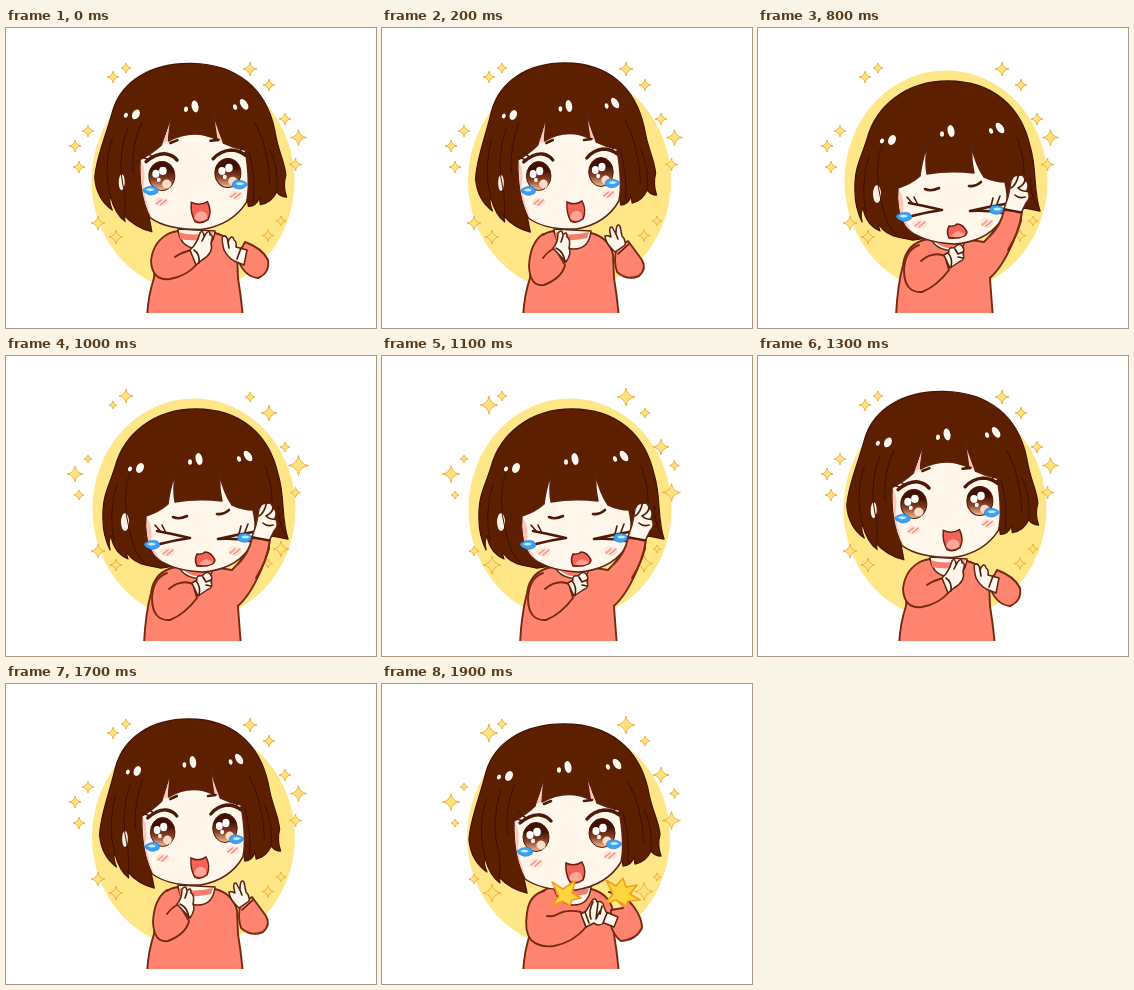
Animation, 370 px wide and 300 px high, one loop 2 s. Source, as an HTML page:

```html
<!DOCTYPE html>
<html lang="en">
<head>
<meta charset="utf-8">
<title>Applause</title>
<style>
html, body { margin: 0; width: 100%; height: 100%; overflow: hidden; background: #fff; }
svg { display: block; width: 100%; height: 100%; }
.line { fill: none; stroke: #4b1b08; stroke-width: 1.6; stroke-linecap: round; stroke-linejoin: round; }
.hair { fill: #5c1f00; stroke: #481500; stroke-width: 1.3; stroke-linejoin: round; }
.strand { fill: none; stroke: #3d1000; stroke-width: 1; stroke-linecap: round; }
.skin { fill: #fff6ec; stroke: #5b2210; stroke-width: 1.5; stroke-linejoin: round; stroke-linecap: round; }
.cloth { fill: #ff8470; stroke: #752a10; stroke-width: 1.9; stroke-linejoin: round; stroke-linecap: round; }
.pink { fill: #ffc5b8; }
.blush { fill: none; stroke: #f58b78; stroke-width: 1.3; stroke-linecap: round; }
.star { fill: #ffe37c; stroke: #efaa3d; stroke-width: .9; stroke-linejoin: round; }
.spark { fill: #ffd63e; stroke: #f59d1e; stroke-width: 1.6; stroke-linejoin: round; }
.thick { stroke-width: 2.6; }
.lash { stroke-width: 3.4; }
</style>
</head>
<body>
<svg viewBox="0 0 370 300" xmlns="http://www.w3.org/2000/svg">
  <defs>
    <linearGradient id="iris" x1="0" y1="0" x2="0" y2="1">
      <stop offset=".3" stop-color="#421003"/>
      <stop offset=".65" stop-color="#8a4328"/>
      <stop offset="1" stop-color="#f8bd98"/>
    </linearGradient>
    <clipPath id="crop"><rect width="370" height="285"/></clipPath>
  </defs>
  <ellipse id="disc" cx="187" cy="153" rx="101.5" ry="110.5" fill="#ffe788"/>
  <g id="stars"></g>
  <g id="poses" clip-path="url(#crop)"></g>
</svg>
<script>
const $ = id => document.getElementById(id);
const path = (cls, d) => `<path class="${cls}" d="${d}"/>`;
const oval = (x, y, rx, ry, fill, turn = 0) =>
  `<ellipse cx="${x}" cy="${y}" rx="${rx}" ry="${ry}" fill="${fill}" transform="rotate(${turn} ${x} ${y})"/>`;

const eye = (x, y) => `<g transform="translate(${x} ${y})">
  <ellipse rx="13" ry="14.5" fill="url(#iris)" stroke="#4b1b08" stroke-width="1"/>
  ${oval(1, -5, 3.8, 4.2, "#fff")}${oval(-6, -2, 3.6, 4, "#fff")}${oval(-3, 4, 2, 2.2, "#fff")}
  ${oval(5, 8, 4.6, 4.4, "#ffdcc2")}</g>`;

const tear = (x, y, flip = 1) => `<g transform="translate(${x} ${y}) scale(${flip} 1)">
  <path d="M-8 0Q-2 -5 5 -3Q9 0 7 3Q1 7 -4 4Q-7 3 -8 0Z" fill="#3aa2f2" stroke="#2381d4" stroke-width=".7"/>
  <path d="M-5 0Q0 -3 4 0Q0 3 -5 0Z" fill="#c6ecff"/></g>`;

const blush = (x, y) => oval(x, y, 7, 4.5, "#ffe3da") +
  path("blush", `M${x - 5} ${y + 2}l5 -4M${x - 1} ${y + 3}l6 -5`);

const shine = (x, y) => [
  [0, 0, 3.4, 6, -12], [-59, 9, 3.6, 5.2, 28], [-69, 10, 2, 2.6, 25],
  [-9, 3, 2, 2.8, 0], [49, -3, 3.3, 6, -35], [40, 0, 2, 2.8, -20]
].map(([dx, dy, rx, ry, turn]) => oval(x + dx, y + dy, rx, ry, "#fffaf1", turn)).join("");

const ear = oval(114, 160, 3, 8, "#fff1e5");

const brightHead = (transform, extra = "") => `<g transform="${transform}">
  ${path("hair", "M182 40C140 40 112 60 104 88C98 113 88 135 87 156Q89 177 105 188Q101 179 103 174Q108 192 118 199L117 193Q128 205 145 209L141 190L190 195L238 160L241 182Q249 182 252 173L253 180Q264 178 269 167Q273 172 279 172Q275 161 278 150C276 134 270 128 266 105C257 65 228 40 182 40Z")}
  ${extra}
  ${path("strand", "M119 106Q108 138 117 170Q119 186 117 193M104 116Q95 145 103 174M133 100Q123 122 125 150M246 98Q260 122 262 160M241 130Q248 150 246 178M262 125Q271 144 269 167")}
  ${path("skin", "M132 137Q145 130 153 122Q158 108 162 94Q160 108 160 118Q185 104 209 116Q207 102 205 89Q209 106 215 119Q226 124 237 126Q243 160 239 178Q225 201 194 206Q160 207 143 195Q131 172 132 137Z")}
  ${path("pink", "M133 138Q138 145 136 165Q139 185 146 196Q133 181 133 138ZM154 121Q159 108 161 99L159 118ZM209 115L206 97Q210 109 214 118Z")}
  ${shine(186, 83)}
  ${eye(154, 153)}${eye(220, 149)}
  <g class="line">
    ${path("lash", "M138 139Q149 130 158 131Q165 132 169 137M205 135Q212 127 222 126Q231 126 237 131")}
    ${path("thick", "M162 120L169 117M202 117L210 116")}
    <path d="M141 137L132 134M144 134L136 128M235 129L241 128M232 127L234 122"/>
  </g>
  ${tear(143, 167)}${tear(232, 159.5, -1)}${blush(154, 179)}${blush(228, 171)}
  <path d="M184 179Q192 183 200 178Q205 187 201 196Q194 201 188 198Q183 190 184 179Z" fill="#f36357" stroke="#672011" stroke-width="1.5"/>
  <path d="M187 195Q189 187 195 188Q201 189 200 195Q193 200 187 195Z" fill="#ffa798"/>
</g>`;

const winceHead = `
  ${path("hair", "M190 53C148 53 118 78 109 111C103 131 96 139 97 164Q97 179 104 194Q102 184 105 180Q108 197 122 203Q120 199 121 197Q128 207 140 209L155 212L235 200L250 190L267 180L282 183C275 162 279 140 272 118C263 79 235 53 190 53Z")}
  ${oval(119, 166, 4, 9, "#fff1e5")}
  ${path("strand", "M125 112Q114 140 124 177Q128 197 138 206M111 128Q102 157 108 184M259 110Q267 130 266 148M272 150Q272 165 279 178")}
  ${path("skin", "M140 160Q153 156 162 148Q164 132 169 118Q167 134 169 146Q191 142 216 145Q213 132 214 120Q218 137 226 149Q237 154 247 154Q253 178 242 194Q227 214 196 216Q160 214 147 198Q138 181 140 160Z")}
  ${path("pink", "M141 162Q147 169 145 185Q149 199 157 206Q138 194 141 162Z")}
  ${shine(193, 103)}
  <g class="line">
    ${path("thick", "M167 161Q173 164 181 160M211 158Q217 159 223 154")}
    ${path("thick", "M151 175Q167 178 184 182Q169 184 154 188M247 176Q229 179 212 183Q229 182 244 185")}
    <path d="M155 176L149 169M160 177L156 169M239 176L242 168M233 178L235 170"/>
  </g>
  ${tear(146, 188)}${tear(239, 181, -1)}${blush(162, 196)}${blush(229, 195)}
  <path d="M191 198Q196 199 199 196Q205 196 209 204Q208 211 191 210Q188 204 191 198Z" fill="#f36357" stroke="#672011" stroke-width="1.6"/>
  <path d="M193 208Q200 199 207 207Q200 211 193 208Z" fill="#ffa092"/>`;

const torso =
  path("cloth", "M172 203Q156 205 150 222L148 250Q142 268 141 290H237Q235 268 232 250L231 226Q226 209 209 205Z") +
  path("skin", "M172 201Q173 218 190 221Q207 222 209 203Z") +
  `<path d="M173 204Q185 209 207 204L205 210Q185 214 174 211Z" fill="#f77c6b"/>`;

const poses = {
  half: torso + brightHead("translate(1 -4.5) rotate(1 190 200)", ear) +
    path("cloth", "M164 205Q147 213 145 233Q146 253 164 251Q181 248 191 236L186 222Q176 224 169 229M232 232Q239 249 252 250Q264 245 262 232Q256 220 239 214L233 225Z") +
    path("skin", "M184 222Q191 216 194 205Q197 201 198 208Q204 200 204 207Q208 206 205 215Q208 225 196 232L190 237ZM233 235Q223 232 218 222Q215 210 217 208Q221 207 222 214Q226 205 228 212Q231 214 230 219L241 222L238 237Z") +
    path("line", "M188 222Q194 226 193 235M196 213L199 207M235 220L231 231M222 214L223 220"),
  open: torso + brightHead("translate(11.5 -5) scale(.943 1)", ear) +
    path("cloth", "M161 206Q148 215 147 238Q148 259 162 257Q180 250 183 237L173 220Q166 223 161 230M235 219Q231 232 235 244Q245 253 257 248Q265 241 260 232L246 213Z") +
    path("skin", "M171 220Q176 215 176 205Q180 200 181 207Q185 202 185 209Q189 211 187 220Q190 225 184 234ZM233 224Q223 215 223 208Q225 207 229 209Q226 198 230 199L234 206Q234 194 238 198L240 208Q244 212 243 217Z") +
    path("line", "M174 220Q182 224 183 234M181 208L179 214M236 226L247 216M234 206L236 211"),
  clap: torso + brightHead("") +
    path("cloth", "M162 207Q147 211 145 229Q142 247 149 256Q158 264 172 262Q192 258 204 243L199 228Q185 225 176 230Q172 233 165 232M227 208Q244 211 252 223Q260 234 260 244Q254 256 239 257Q232 252 229 242L229 226L241 224") +
    path("skin", "M199 230L204 227L210 217Q213 212 215 218Q221 216 222 223L224 228L236 233L232 243L222 239Q216 243 212 239L204 243Z") +
    path("line", "M211 218Q206 228 209 235M216 219L214 235L218 227M203 228L207 239M225 229L221 239M220 222L218 230") +
    path("spark", "M170 198L181 205L193 197L190 209L199 214L190 216L188 221L180 217L170 222L177 212Z") +
    path("spark", "M224 196L234 202L241 194L244 203L255 201L248 210L258 216L246 217L244 222L234 216L223 220L231 210Z"),
  wince:
    path("cloth", "M170 211Q148 215 145 237Q139 260 138 290H235Q233 265 232 250Q249 235 263 193L263 183L246 180Q241 200 226 214L207 211Z") +
    path("skin", "M173 211Q180 225 203 222L208 212Z") +
    `<path d="M177 213Q190 218 206 214L203 220Q184 222 177 213Z" fill="#f77c6b"/>` +
    winceHead +
    path("cloth", "M232 208Q243 197 246 182L264 184Q261 205 250 222") +
    path("skin", "M246 181L250 169Q252 161 253 153Q256 146 260 148Q266 145 267 152Q272 155 269 162Q274 169 268 175L263 185Z") +
    path("line", "M253 160Q258 157 260 149M260 160Q266 157 267 152M260 160Q264 164 270 163M257 167Q261 171 267 169M247 181L263 184") +
    path("cloth", "M161 217Q147 222 146 242Q146 265 164 264Q179 258 191 242L187 228Q175 223 163 233") +
    path("skin", "M186 227L191 224Q190 219 196 220Q201 214 204 218Q207 221 205 226Q208 231 201 234L192 240Z") +
    path("line", "M190 225Q195 230 193 239M197 221L200 226L205 224M200 229L205 230")
};

// x, y, then the radius at rest and in the two twinkles
const stars = [
  [107, 49, 6, 4, 9], [120, 40, 5, 7, 5], [244, 41, 7, 5, 9], [263, 57, 6, 8, 5],
  [69, 118, 6, 8, 8.5], [82, 103, 6, 4, 4], [73, 139, 6, 5, 4], [279, 91, 6, 5, 8],
  [292.5, 109.5, 8, 10, 5], [289.5, 136.5, 6.5, 5, 9], [92, 195, 7, 7, 5],
  [110, 209, 7, 6, 9], [275, 193, 5, 8, 4], [262, 207.5, 6, 4.5, 9]
];
const starPath = ([x, y, ...radii], mode) => {
  const r = radii[mode], c = r * .13;
  return `M${x} ${y - r}Q${x + c} ${y - c} ${x + r} ${y}Q${x + c} ${y + c} ${x} ${y + r}` +
    `Q${x - c} ${y + c} ${x - r} ${y}Q${x - c} ${y - c} ${x} ${y - r}Z`;
};

$("stars").innerHTML = [0, 1, 2].map(mode =>
  `<g>${path("star", stars.map(s => starPath(s, mode)).join(""))}</g>`).join("");
$("poses").innerHTML = Object.values(poses).map(art => `<g>${art}</g>`).join("");

// One digit per 100 ms: 0 half, 1 open, 2 clap, 3 wince
const poseSteps = "00112223333330120112";
// 0 rest, 1 and 2 the twinkles
const starSteps = "00001120001200200012";
const discX = [187, 187.5, 186.5, 188];

const show = (group, index) => [...group.children].forEach((child, i) => {
  child.style.display = i === index ? "" : "none";
});
let last = -1;
function tick() {
  const step = Math.floor(performance.now() % 2000 / 100);
  if (step !== last) {
    const pose = +poseSteps[step];
    show($("poses"), pose);
    show($("stars"), +starSteps[step]);
    $("disc").setAttribute("cx", discX[pose]);
    last = step;
  }
  requestAnimationFrame(tick);
}
tick();
</script>
</body>
</html>
```
